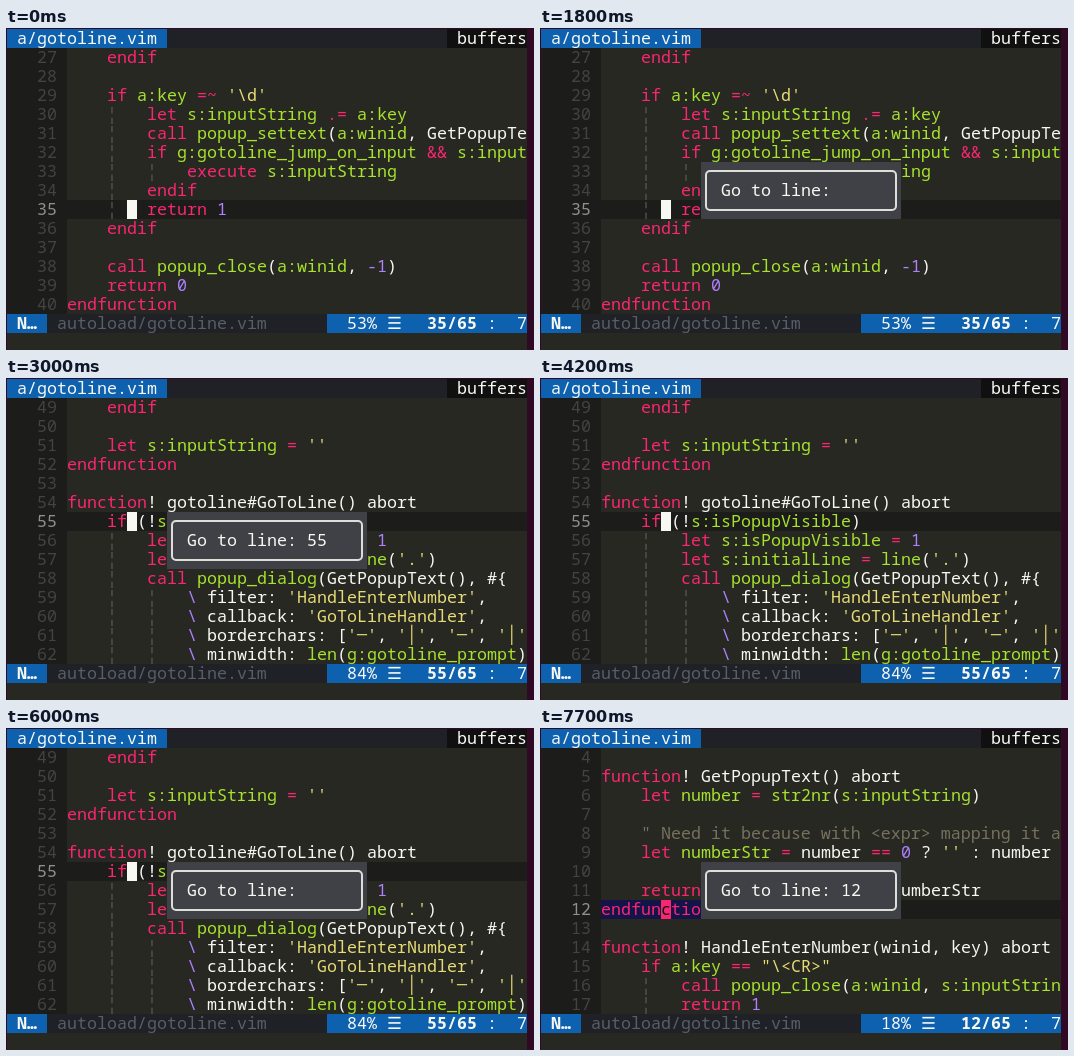
Recreate the animation shown at these times as an HTML page. Size 528 by 322 pixels, loop 8 s.

```html
<!DOCTYPE html>
<html lang="en">
<head>
<meta charset="utf-8">
<title>Go to line</title>
<style>
html, body { margin: 0; width: 528px; height: 322px; overflow: hidden; background: #300a24; }
#screen { position: absolute; inset: 0; overflow: hidden; }
#screen div {
  position: absolute; height: 19px; white-space: pre;
  font: 16.6667px/17px "Noto Sans Mono", "DejaVu Sans Mono", monospace;
}
#screen .frame {
  left: 165px; top: 142px; width: 188px; height: 37px;
  border: 2px solid #deded8; border-radius: 5px;
}
</style>
</head>
<body>
<div id="screen"></div>
<script>
const C = {
  fg: '#f8f8f2', bg: '#272822', pink: '#f92672', green: '#a6e22e', yellow: '#e6db74',
  purple: '#ae81ff', comment: '#75715e', gutter: '#1c1c1a', number: '#434340',
  current: '#8f908a', guide: '#5a5a54', word: '#14144a', blue: '#0e61ae',
  bar: '#1f2126', path: '#575e68', popup: '#404146', black: '#101010'
};
const COLS = 52, ROWS = 14, TEXT = 6, CURSOR = 6, LOOP = 8000;

// Blocks of the file, keyed by their first line number
const blocks = {
  1: String.raw`let s:isPopupVisible = 0
let s:inputString = ''
let s:initialLine = -1

function! GetPopupText() abort
    let number = str2nr(s:inputString)

    " Need it because with <expr> mapping it also
    let numberStr = number == 0 ? '' : number

    return g:gotoline_prompt.numberStr
endfunction

function! HandleEnterNumber(winid, key) abort
    if a:key == "\<CR>"
        call popup_close(a:winid, s:inputString)
        return 1`,
  27: String.raw`    endif

    if a:key =~ '\d'
        let s:inputString .= a:key
        call popup_settext(a:winid, GetPopupText())
        if g:gotoline_jump_on_input && s:inputString
            execute s:inputString
        endif
        return 1
    endif

    call popup_close(a:winid, -1)
    return 0
endfunction`,
  49: String.raw`    endif

    let s:inputString = ''
endfunction

function! gotoline#GoToLine() abort
    if (!s:isPopupVisible)
        let s:isPopupVisible = 1
        let s:initialLine = line('.')
        call popup_dialog(GetPopupText(), #{
            \ filter: 'HandleEnterNumber',
            \ callback: 'GoToLineHandler',
            \ borderchars: ['─', '│', '─', '│'],
            \ minwidth: len(g:gotoline_prompt)`
};
const file = [];
for (const first in blocks)
  blocks[first].split('\n').forEach((s, i) => file[+first + i] = s);

const syntax = [
  ['comment', /^\s+".*/y],
  ['purple', /(?<=^\s+)\\/y],
  ['yellow', /'[^']*'|"[^"]*"/y],
  ['green', /\b[asg]:\w+|(?<=let )\w+|\b(popup_\w+|str2nr|line|len)(?=\()/y],
  ['pink', /\b(let|call|if|endif|return|execute|function|endfunction)\b|&&|[=.]?=~?/y],
  ['purple', /-?\b\d+\b/y],
  ['fg', /\w+|./y]
];

// Start time, top line, cursor line, popup input (null = closed), pending keys, word highlight
const states = [
  [0, 27, 35, null, '', 0],
  [1500, 27, 35, null, '^G', 0],
  [1800, 27, 35, '', '', 0],
  [2600, 1, 5, '5', '', 0],
  [2800, 1, 5, '5', '', 1],
  [3000, 49, 55, '55', '', 0],
  [4200, 49, 55, null, '', 0],
  [5700, 49, 55, null, '^G', 0],
  [6000, 49, 55, '', '', 0],
  [6700, 1, 1, '1', '', 0],
  [6800, 1, 1, '1', '', 1],
  [7600, 4, 12, '12', '', 0],
  [7700, 4, 12, '12', '', 1]
];

const screen = document.getElementById('screen');

function put(row, col, text, color, back, bold) {
  const d = document.createElement('div');
  d.textContent = text;
  d.style.cssText = `left:${1 + col * 10}px;top:${1 + row * 19}px;width:${text.length * 10}px;` +
    `color:${color};background:${back || 'none'};font-weight:${bold ? 700 : 400}`;
  screen.append(d);
}

const fill = (row, col, n, back) => put(row, col, ' '.repeat(n), C.fg, back);

function tokens(s) {
  const out = [];
  for (let i = 0; i < s.length;) {
    for (const [color, re] of syntax) {
      re.lastIndex = i;
      const m = re.exec(s);
      if (!m) continue;
      out.push([i, m[0], C[color]]);
      i += m[0].length;
      break;
    }
  }
  return out;
}

function wordAt(s, col) {
  for (const m of s.matchAll(/\w+/g))
    if (m.index <= col && col < m.index + m[0].length) return m[0];
}

function drawLine(row, n, cur, word) {
  const s = file[n].slice(0, COLS - TEXT), here = n === cur;
  fill(row, 0, TEXT, C.gutter);
  fill(row, TEXT, COLS - TEXT, here ? C.gutter : C.bg);
  put(row, 3, String(n).padStart(2), here ? C.current : C.number);
  if (word)
    for (const m of s.matchAll(new RegExp(`\\b${word}\\b`, 'g')))
      fill(row, TEXT + m.index, word.length, C.word);
  for (let g = 4; g < s.search(/\S/); g += 4) put(row, TEXT + g, '¦', C.guide);
  for (const [i, text, color] of tokens(s)) {
    if (text.trim()) put(row, TEXT + i, text, color);
    const k = CURSOR - i;
    if (here && k >= 0 && k < text.length) put(row, TEXT + CURSOR, text[k], C.black, color);
  }
}

function draw([, top, cur, input, keys, mark]) {
  screen.replaceChildren();
  fill(0, 0, COLS, C.bar);
  put(0, 0, ' a/gotoline.vim ', C.fg, C.blue);
  put(0, 44, ' buffers', C.fg, C.black);

  const word = mark && wordAt(file[cur], CURSOR);
  for (let r = 0; r < ROWS; r++) drawLine(r + 1, top + r, cur, word);

  fill(15, 0, COLS, C.bar);
  put(15, 0, ' N… ', C.fg, C.blue, true);
  put(15, 5, 'autoload/gotoline.vim', C.path);
  fill(15, 32, 20, C.blue);
  put(15, 33, `${Math.floor(cur * 100 / 65)}%`.padStart(4), C.fg);
  put(15, 38, '☰', C.fg);
  put(15, 42, `${cur}/65`.padStart(5), C.fg, '', true);
  put(15, 48, ':  7', C.fg);

  fill(16, 0, COLS, C.bg);
  put(16, 42, keys, C.fg);

  if (input !== null) {
    for (let r = 7; r < 10; r++) fill(r, 16, 20, C.popup);
    const frame = document.createElement('div');
    frame.className = 'frame';
    screen.append(frame);
    put(8, 18, 'Go to line: ' + input, C.fg);
  }
}

let shown;
function tick() {
  const t = performance.now() % LOOP;
  const state = states.findLast(s => s[0] <= t);
  if (state !== shown) draw(shown = state);
  requestAnimationFrame(tick);
}
tick();
</script>
</body>
</html>
```
